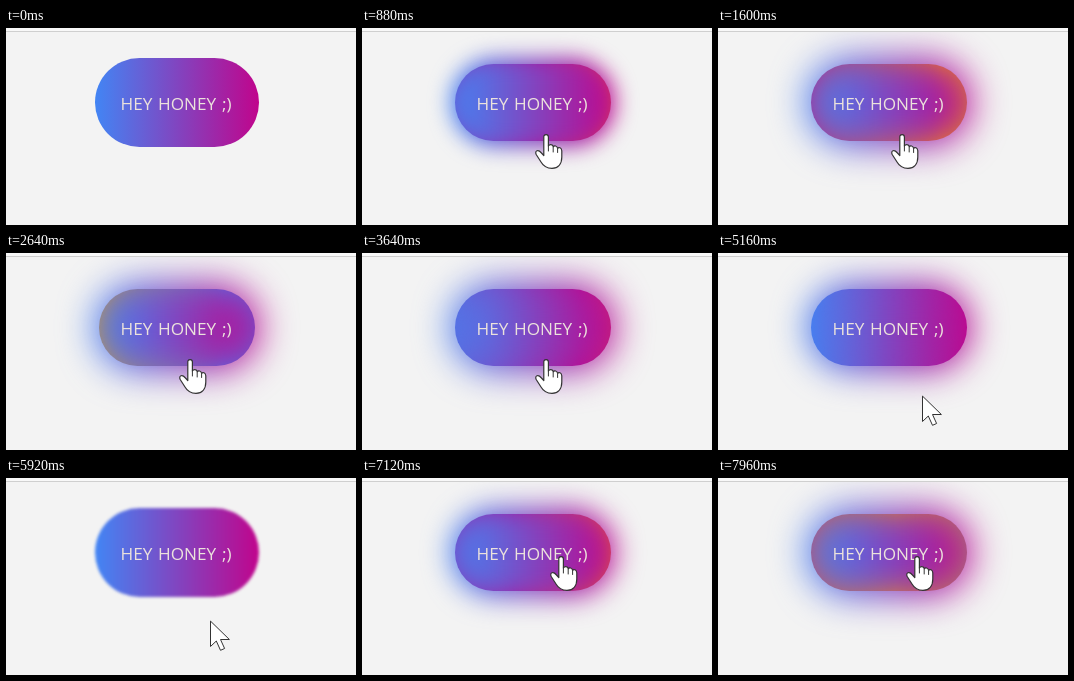
These frames come from a looping animation (350 by 197 pixels, 8000 ms). An HTML page:

```html
<!DOCTYPE html>
<html lang="en">
<head>
<meta charset="utf-8">
<title>Glow button</title>
<style>
  html, body { margin: 0; width: 100%; height: 100%; overflow: hidden; background: #f3f3f3; }
  #stage { position: relative; width: 350px; height: 197px; overflow: hidden; }
  #stage > * { position: absolute; }
  #rule { left: 0; top: 0; width: 350px; height: 3px; background: #f8f8f8; border-bottom: 1px solid #cfcfcf; }
  .pill {
    background: linear-gradient(90deg, #4285f4, #c0058c 33.33%, #ffa000 66.67%, #4285f4) 0 0 / 300% 100%;
  }
  #button { left: 93px; top: 36px; width: 156px; height: 77px; border-radius: 39px; }
  #glow { left: 89px; top: 30px; width: 164px; height: 88.5px; border-radius: 45px; }
  svg { left: 0; top: 0; width: 350px; height: 197px; }
  text { font: 500 17.2px "Open Sans", "Noto Sans", sans-serif; word-spacing: 1.2px; fill: #ece2dc; }
  #cursor path { fill: #fff; stroke: #333; stroke-linejoin: round; stroke-linecap: round; }
</style>
</head>
<body>
<div id="stage">
  <div id="button" class="pill"></div>
  <div id="glow" class="pill"></div>
  <div id="rule"></div>
  <svg viewBox="0 0 350 197">
    <text x="114.5" y="82">HEY HONEY ;)</text>
    <g id="cursor">
      <path id="arrow" stroke-width="1" d="M.5 .5V25.5L6.3 20L10.5 29.3L14.6 27.5L10.5 18.5H19Z"/>
      <g id="hand" stroke-width="1.2">
        <path d="M-2.2 3Q-2.2 .7 .1 .7T2.4 3V12Q3 10.5 5 10.6T7.2 12.8Q8 11.6 9.6 12T11.6 14.3Q12.5 13.2 14 13.8T15.8 16.8V23C15.8 30 12 34.3 6 34.3C0 34.3 -3 31.5 -5 28L-9.8 20.5Q-11 17.5 -9 16.8T-5 18.5L-2.2 21.5Z"/>
        <path d="M2.4 12V17M7.2 13.5V18M11.6 15V18.5" stroke-width="1"/>
      </g>
    </g>
  </svg>
</div>
<script>
const LOOP = 8000, FADE = 1300, PERIOD = 3000, BLUR = 18;
const HOVERS = [[440, 5080], [6500, Infinity]];
// Cursor tip: time, x, y
const PATH = [
  [100, 178, 200], [560, 184, 106], [4860, 184, 106], [5140, 204, 143],
  [6250, 204, 143], [6740, 199, 78], [LOOP, 199, 78]
];
const byId = id => document.getElementById(id);
const clamp = v => Math.min(1, Math.max(0, v));
const bezier = (u, a, b) => 3 * u * (1 - u) ** 2 * a + 3 * u * u * (1 - u) * b + u ** 3;

// CSS "ease", cubic-bezier(.25, .1, .25, 1)
function ease(x) {
  if (x <= 0 || x >= 1) return clamp(x);
  let low = 0, high = 1;
  for (let i = 0; i < 20; i++) {
    const mid = (low + high) / 2;
    if (bezier(mid, .25, .25) < x) low = mid; else high = mid;
  }
  return bezier(low, .1, 1);
}

function cursorAt(t) {
  if (t <= PATH[0][0]) return PATH[0].slice(1);
  const i = PATH.findIndex(p => p[0] >= t);
  const [t0, x0, y0] = PATH[i - 1], [t1, x1, y1] = PATH[i];
  const k = (t - t0) / (t1 - t0), s = k * k * (3 - 2 * k);
  return [x0 + (x1 - x0) * s, y0 + (y1 - y0) * s];
}

function render(t) {
  const hover = HOVERS.find(([from, to]) => t >= from && t < to);
  const amount = HOVERS.reduce((sum, [from, to]) =>
    sum + ease(clamp((t - from) / FADE)) - ease(clamp((t - to) / FADE)), 0);
  const phase = hover ? (t - hover[0]) / PERIOD % 1 : 0;

  byId("button").style.backgroundPositionX = `${-phase * 156 * 3}px`;
  byId("glow").style.filter = amount > .001 ? `blur(${amount * BLUR}px)` : "none";
  byId("cursor").setAttribute("transform", `translate(${cursorAt(t)})`);
  byId("hand").style.display = hover ? "" : "none";
  byId("arrow").style.display = hover ? "none" : "";
}

let start;
function frame(now) {
  start ??= now;
  render((now - start) % LOOP);
  requestAnimationFrame(frame);
}
render(0);
requestAnimationFrame(frame);
</script>
</body>
</html>
```
